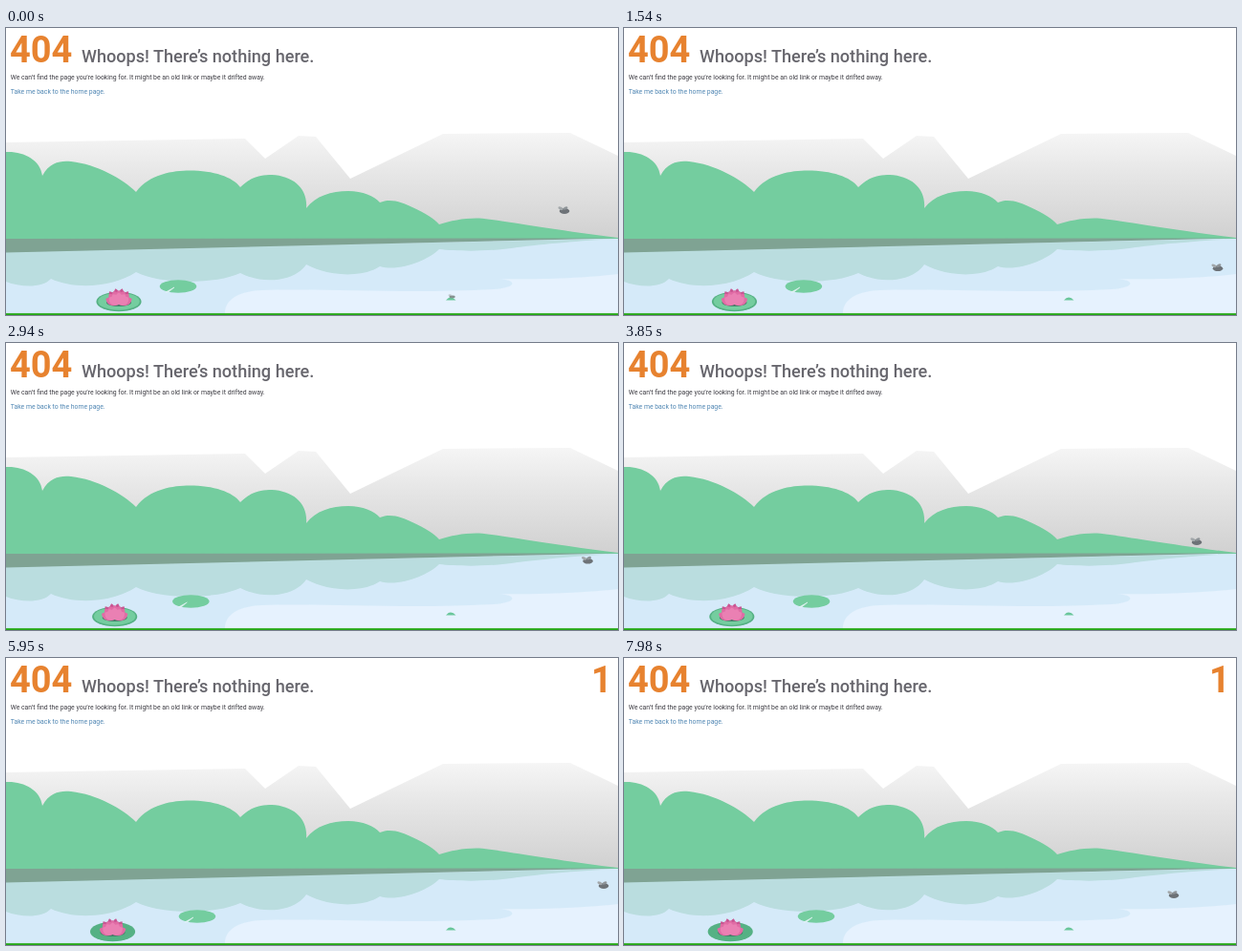
An HTML page for the animation above (8 s loop, 640 px wide and 301 px high).

```html
<!DOCTYPE html>
<html lang="en">
<head>
<meta charset="utf-8">
<title>404</title>
<style>
  html, body { margin: 0; width: 100%; height: 100%; overflow: hidden; background: #fff; }
  svg { display: block; width: 100%; height: 100%; }
  text { font-family: Roboto, sans-serif; }
  .number { font-size: 38px; font-weight: 700; fill: #e7822f; }
  .heading { font-size: 18.1px; font-weight: 500; fill: #67666d; }
  .small { font-size: 6.87px; fill: #3c3b42; }
  .link { fill: #4f86b3; }
</style>
</head>
<body>
<svg viewBox="0 0 640 301">
  <defs>
    <linearGradient id="haze" gradientUnits="userSpaceOnUse" x1="0" y1="108" x2="0" y2="222">
      <stop offset="0" stop-color="#f6f6f6"/>
      <stop offset=".4" stop-color="#e6e6e6"/>
      <stop offset="1" stop-color="#d0d0d0"/>
    </linearGradient>
  </defs>

  <text class="number" x="4" y="36">404</text>
  <text class="heading" x="79" y="35.5">Whoops! There’s nothing here.</text>
  <text class="small" x="4.7" y="53.8">We can’t find the page you’re looking for. It might be an old link or maybe it drifted away.</text>
  <text class="small link" x="4.7" y="69">Take me back to the home page.</text>
  <text class="number" id="score" x="612" y="36">1</text>

  <!-- mountains and hills -->
  <path fill="url(#haze)" d="M0 120 L250 116 L271 137 L306 113 L324 114 L360 158 L457 111 L590 110 L640 134 V222 H0Z"/>
  <path fill="#74cd9f" d="M0 130 C18 129 36 138 38 155 C46 140 58 139 68 140 C95 143 122 158 136 172
    C150 153 175 149.5 192 149.5 C217 149.5 237 156 245 167 C257 155 268 154 278 154 C300 155 316 168 314 189
    C324 176 340 171 358 171 C373 171 385 176 391 183 C402 178 415 183 425 188 C438 194 448 200 453 206
    C465 202 480 199 495 199.5 C520 202 580 213 640 220 V222 H0Z"/>

  <!-- lake -->
  <path fill="#d5eaf9" d="M0 221 H640 V301 H0Z"/>
  <path fill="#e6f2fe" d="M229 301 C228 288 238 276 268 275 C340 273 420 279 510 274 C536 272 534 264 515 263
    C540 264 600 263 640 258 V301Z"/>
  <path fill="#badddf" d="M0 234 L640 221 C600 223 560 227 535 230 C505 235 470 234 453 232 C442 243 412 256 391 250
    C375 261 340 262 314 248 C303 265 270 270 245 257 C220 269 160 269 136 256 C110 273 70 274 47 263
    C38 273 15 272 0 266Z"/>
  <path fill="#7fa393" d="M0 221 L640 220.5 L0 235.5Z"/>

  <g id="pad">
    <ellipse rx="19.3" ry="6.8" fill="#74cd9f"/>
    <path d="M-13 6 L-4 1 L-10 5.8Z" fill="#e5f4f5" stroke="#e5f4f5" stroke-width=".6"/>
  </g>

  <g id="lily">
    <ellipse rx="23.6" ry="10.3" fill="#55b184"/>
    <ellipse id="padLight" cy="-.3" rx="21.8" ry="9" fill="#74cd9f"/>
    <ellipse cy="1" rx="13" ry="4" fill="#3f7d66"/>
    <g id="petals"></g>
  </g>

  <path d="M460 285.5 Q465 279.5 470.5 285.5Z" fill="#69c69a"/>
  <g id="tongue">
    <path id="tongueLine" fill="none" stroke="#d58bb5" stroke-width=".9"/>
    <circle id="tongueTip" r="1.2" fill="#cf437f"/>
  </g>

  <g id="fly">
    <ellipse cx="1" cy="1" rx="5.3" ry="2.9" fill="#6d7277"/>
    <ellipse cx="-3" cy="-1.8" rx="2.8" ry="1.5" fill="#a2a7aa" transform="rotate(25 -3 -1.8)"/>
    <ellipse cx="2" cy="-2" rx="2.6" ry="1.5" fill="#8e9498" transform="rotate(-25 2 -2)"/>
  </g>
  <g id="snack" transform="translate(466 281.3) scale(.6)">
    <ellipse cx="1" cy="1" rx="5.2" ry="2.2" fill="#85908f"/>
    <ellipse cx="-3" cy="-2" rx="3" ry="1.2" fill="#a9b1b3"/>
  </g>

  <rect y="299.2" width="640" height="1.8" fill="#22a812"/>
</svg>
<script>
  const LOOP = 8000, MOUTH = [465, 283.5], CATCH = 4550;
  const el = id => document.getElementById(id);
  const mix = (a, b, k) => a + (b - a) * k;
  const clamp = v => Math.max(0, Math.min(1, v));
  const show = (id, on) => el(id).style.display = on ? '' : 'none';
  const place = (id, x, y) => el(id).setAttribute('transform', `translate(${x} ${y})`);

  // Each row: time, x, y
  const firstFly = [[0, 583, 191], [770, 627, 263], [2240, 614, 241], [3850, 598, 208], [CATCH, 592, 216]];
  const secondFly = [[5110, 648, 226], [5950, 624, 238], [7350, 574, 248], [8000, 574, 248]];
  // Each row: peak time, tip x, tip y
  const strikes = [[2240, 581, 250], [CATCH, 592, 216]];

  function along(path, t) {
    let i = 0;
    while (i < path.length - 2 && t > path[i + 1][0]) i++;
    const [a, b] = [path[i], path[i + 1]];
    const k = clamp((t - a[0]) / (b[0] - a[0]));
    const eased = k * k * (3 - 2 * k);
    return [mix(a[1], b[1], eased), mix(a[2], b[2], eased)];
  }

  function addPetals(angles, length, width, color) {
    for (const angle of angles) {
      el('petals').innerHTML += `<path transform="translate(0 3) rotate(${angle})" fill="${color}"
        d="M0 0 C${-width} ${-length * .35} ${-width} ${-length * .75} 0 ${-length}
        C${width} ${-length * .75} ${width} ${-length * .35} 0 0"/>`;
    }
  }
  addPetals([-36, -12, 12, 36], 17, 4.5, '#c95693');
  addPetals([-66, 66, -44, 44, -22, 22, 0], 15, 5.5, '#e06ca5');
  addPetals([-55, 55, -30, 30, 0], 12.5, 5.5, '#ea80b3');

  function drawTongue([x, y]) {
    const bend = [mix(MOUTH[0], x, .5), mix(MOUTH[1], y, .5) - 2.5];
    el('tongueLine').setAttribute('d', `M${MOUTH} Q${bend} ${x},${y}`);
    el('tongueTip').setAttribute('cx', x);
    el('tongueTip').setAttribute('cy', y);
  }

  function draw(t) {
    const drift = 1 - (1 - t / LOOP) ** 2.2;
    place('pad', 180 + 21 * drift, 271);
    place('lily', 118 - 6.8 * drift, 287);
    el('padLight').style.opacity = clamp((5600 - t) / 1500);

    const strike = strikes.find(s => Math.abs(t - s[0]) < 210);
    let tip = MOUTH;
    if (strike) {
      const reach = 1 - Math.abs(t - strike[0]) / 210;
      tip = [mix(MOUTH[0], strike[1], reach), mix(MOUTH[1], strike[2], reach)];
      drawTongue(tip);
    }
    show('tongue', strike);

    const caught = t >= CATCH && t < CATCH + 210;
    place('fly', ...(caught ? tip : along(t < CATCH ? firstFly : secondFly, t)));
    show('fly', t < CATCH + 210 || t >= secondFly[0][0]);
    show('snack', t < 280);
    show('score', t >= CATCH);
  }

  function frame() {
    draw(performance.now() % LOOP);
    requestAnimationFrame(frame);
  }
  frame();
</script>
</body>
</html>
```
